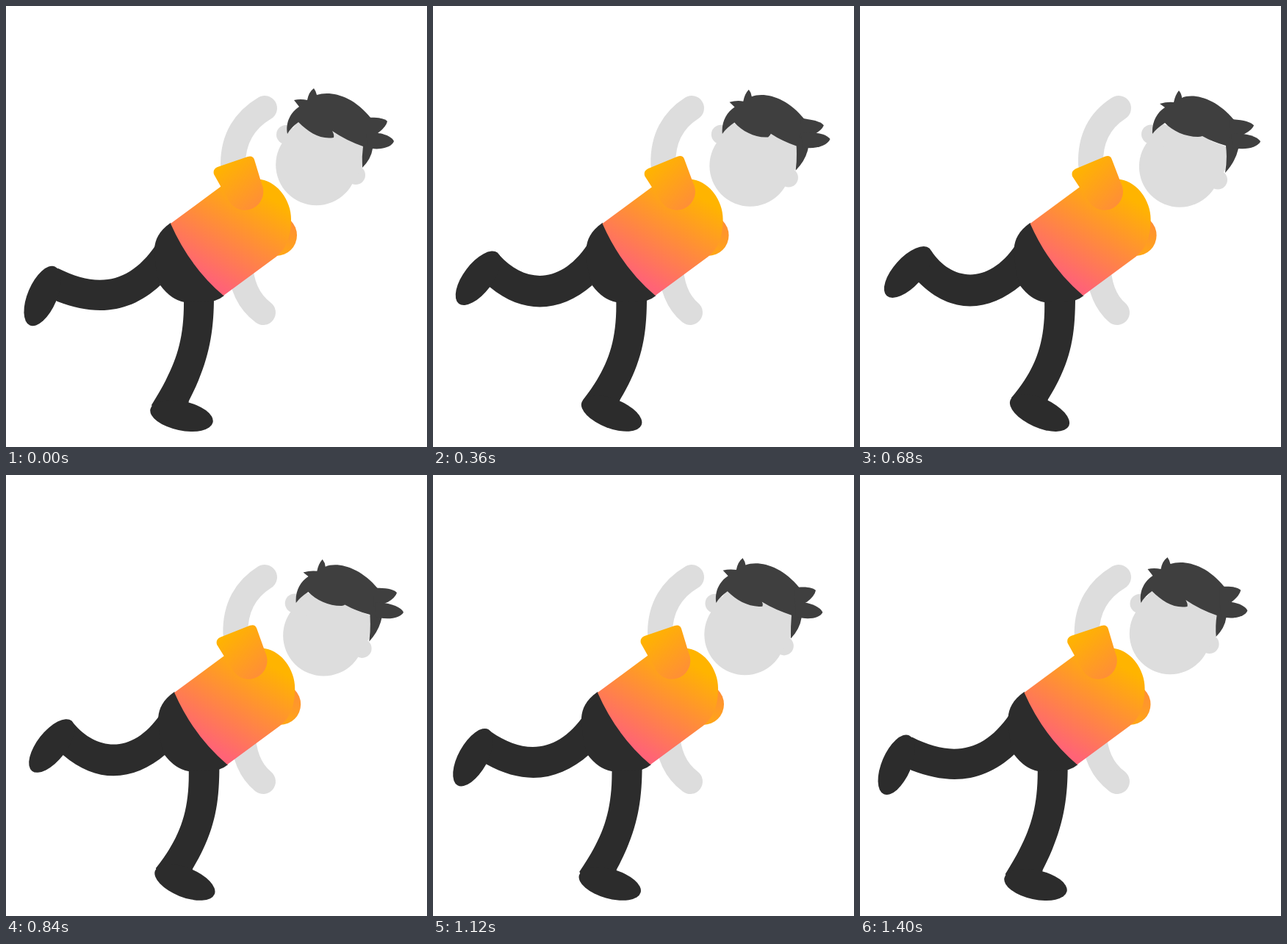
Animation, 573 px wide and 600 px high, one loop 1.44 s. Source, as an HTML page:

```html
<!DOCTYPE html>
<html lang="en">
<head>
<meta charset="utf-8">
<title>Balancing figure</title>
<style>
  html, body { margin: 0; width: 100%; height: 100%; overflow: hidden; background: #fff; }
  svg { display: block; width: 100%; height: 100%; }
  .skin { fill: #ddd; }
  .arm { fill: none; stroke: #ddd; stroke-width: 34; stroke-linecap: round; }
  .pants { fill: #2c2c2c; }
  .hair { fill: #3f3f3f; }
</style>
</head>
<body>
<svg viewBox="0 0 573 600">
  <defs>
    <linearGradient id="shirt" gradientUnits="userSpaceOnUse" x1="270" y1="370" x2="341" y2="250">
      <stop stop-color="#ff6376"/><stop offset="1" stop-color="#ffb400"/>
    </linearGradient>
    <linearGradient id="cuff" gradientUnits="userSpaceOnUse" x1="-29" y1="-36" x2="18" y2="26">
      <stop stop-color="#ffb400"/><stop offset="1" stop-color="#ff8c3a"/>
    </linearGradient>
    <linearGradient id="farCuff" gradientUnits="userSpaceOnUse" x1="380" y1="340" x2="394" y2="292">
      <stop stop-color="#ffa616"/><stop offset="1" stop-color="#ff8d38"/>
    </linearGradient>
  </defs>
  <path id="upperArm" class="arm"/>
  <path id="lowerArm" class="arm"/>
  <path id="backLeg" class="pants"/>
  <ellipse id="backFoot" class="pants" rx="43.5" ry="20"/>
  <path id="frontLeg" class="pants"/>
  <ellipse id="frontFoot" class="pants" rx="43.5" ry="20"/>
  <g id="torso">
    <path class="pants" d="M224 295C208 306 203 318 202 330Q203 362 210 380Q225 400 243 403L284 401Q291 399 297 394Z"/>
    <circle cx="368" cy="312" r="28" fill="url(#farCuff)"/>
    <path fill="url(#shirt)" d="M224 296L300 240Q325 232 347 236C372 240 389 268 388 292C388 312 382 330 368 341L296 394Q250 355 224 296Z"/>
  </g>
  <path id="sleeve" fill="url(#cuff)" d="M-41 -22Q-43 -29 -36 -32L5 -46Q12 -48 14 -42L24 -9A25 25 0 0 1 -22 12Z"/>
  <circle id="leftEar" class="skin" r="13"/>
  <circle id="rightEar" class="skin" r="13"/>
  <g id="face" class="skin">
    <circle r="55.3"/>
    <path d="M-25 -59L64 -27L62 4L40 38L-38 -42Z"/>
  </g>
  <path id="hair" class="hair"/>
  <path id="tuft" class="hair"/>
  <path id="fringe" class="hair"/>
</svg>
<script>
const LOOP = 1440, STEP = 40, REACH = 680;

// Each part: id, attribute, pose at the loop start, pose at REACH, motion group
const parts = [
  ['upperArm', 'd', 'M352 139C325 155 309 180 309 215', 'M352 139C327 155 313 180 314 215', 'body'],
  ['lowerArm', 'd', 'M350 417C334 405 320 385 319 350', 'M350 417C337 406 325 385 324 350', 'body'],
  ['torso', 'transform', 'translate(0 0)', 'translate(7.6 0)', 'body'],
  ['sleeve', 'transform', 'translate(324 251) rotate(0)', 'translate(331.6 251) rotate(-4)', 'body'],
  ['backLeg', 'd',
    'M71 357C125 384 168 378 204 325L210 380C170 417 125 423 70 402L58 395L60 362Z',
    'M97 333C124 374 174 381 212 325L219 380C176 416 125 421 80 376L70 368L85 340Z', 'legs'],
  ['backFoot', 'transform', 'translate(49.5 394.5) rotate(-67)', 'translate(65.5 362) rotate(-48)', 'legs'],
  ['frontLeg', 'd',
    'M242 398C243 460 229 493 198 543L203 552L246 550L249 537C276 485 283 445 283 395Z',
    'M251 398C253 460 238 495 206 533L210 545L252 548L256 535C287 485 293 450 293 395Z', 'stance'],
  ['frontFoot', 'transform', 'translate(239 557.5) rotate(12)', 'translate(244.5 553.5) rotate(24)', 'legs'],
  ['face', 'transform', 'translate(422.5 216)', 'translate(435.2 218.5)', 'head'],
  ['leftEar', 'transform', 'translate(381 175)', 'translate(396 174.5)', 'head'],
  ['rightEar', 'transform', 'translate(476 230)', 'translate(487 236.5)', 'head'],
  ['hair', 'd',
    'M383 174C380 158 388 144 399 137L392 128Q401 126 410 128Q412 117 419 112Q422 116 423 121' +
    'C441 115 472 121 497 153L503 175L499 194Q497 208 485 220Q484 205 486 191Q463 183 444 170' +
    'Q447 175 446 179C428 182 412 172 398 158Q387 166 383 174Z',
    'M398 174C397 158 404 145 415 138L408 133Q418 130 427 131Q429 121 434 115Q438 120 438 125' +
    'C455 118 485 126 509 155L518 175L515 194Q511 212 497 227Q500 208 498 190Q480 185 466 177' +
    'Q463 178 460 178C443 178 425 170 415 159Q403 167 398 174Z', 'head'],
  ['tuft', 'd',
    'M490 152C506 151 516 153 519 157Q517 165 506 173L490 180Z',
    'M503 154C520 154 532 157 536 162Q534 168 523 174L503 180Z', 'head'],
  ['fringe', 'd',
    'M490 172C510 171 525 177 528 184C525 192 510 197 492 193Z',
    'M505 173C526 173 541 178 545 185C541 193 525 197 507 193Z', 'head']
].map(([id, ...rest]) => [document.getElementById(id), ...rest]);
const tuft = document.getElementById('tuft'), fringe = document.getElementById('fringe');

const turn = t => 2 * Math.PI * t / LOOP;

// Sine sway peaking at the given time, 0 at the start and 1 at REACH
function sway(t, peak) {
  const wave = s => Math.cos(turn(s - peak));
  return (wave(t) - wave(0)) / (wave(REACH) - wave(0));
}

// Eased lift up to 560 ms, then a slower fall
function lift(t) {
  const u = t < 560 ? t / 560 : (LOOP - t) / (LOOP - 560);
  return u * u * (3 - 2 * u) / 0.95;
}

const numbers = /-?\d+(\.\d+)?/g;
function mix(from, to, kx, ky) {
  const ends = to.match(numbers);
  let i = 0;
  return from.replace(numbers, n => {
    const k = i % 2 ? ky : kx;
    return (+n + (ends[i++] - n) * k).toFixed(2);
  });
}

function draw(now) {
  const t = Math.floor(now % LOOP / STEP) * STEP;
  const body = sway(t, 560), legs = lift(t);
  const groups = {
    body: [body, body],
    legs: [legs, legs],
    stance: [(body + legs) / 2, legs],
    head: [sway(t, 615), sway(t, 700)]
  };
  for (const [node, attr, from, to, group] of parts)
    node.setAttribute(attr, mix(from, to, ...groups[group]));
  const flick = 5 * Math.sin(turn(t));
  tuft.setAttribute('transform', `rotate(${flick} 500 168)`);
  fringe.setAttribute('transform', `rotate(${-flick} 500 180)`);
}

const start = performance.now();
function tick() {
  draw(performance.now() - start);
  requestAnimationFrame(tick);
}
tick();
</script>
</body>
</html>
```
